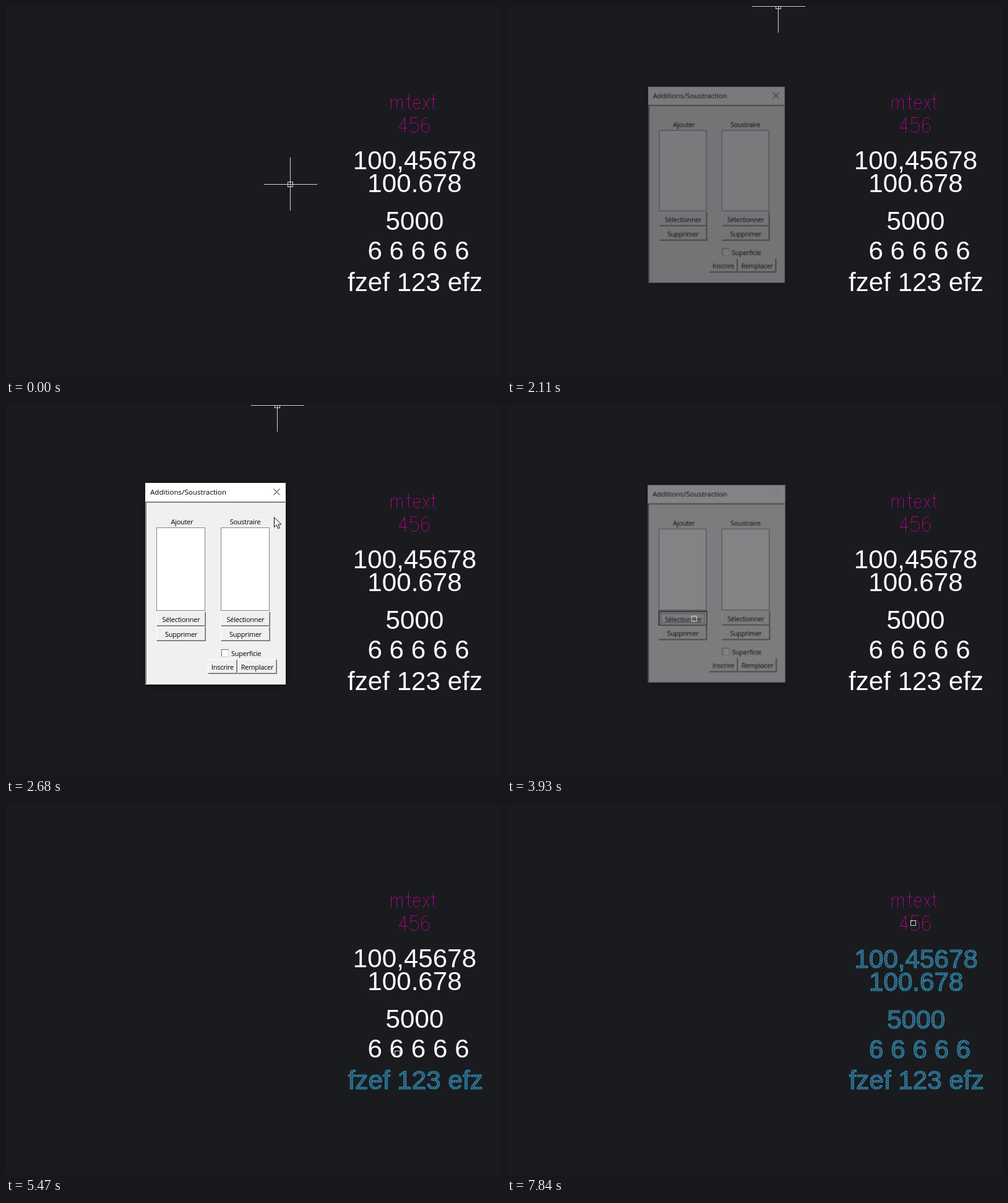
Recreate the animation shown at these times as an HTML page. Size 800 by 600 pixels, loop 8 s.

```html
<!DOCTYPE html>
<html lang="fr">
<head>
<meta charset="utf-8">
<title>Additions/Soustraction</title>
<style>
  html, body { margin: 0; width: 100%; height: 100%; overflow: hidden; background: #1a1b1e; }
  body { position: relative; }
  :root { --loop: 8s infinite; --glide: cubic-bezier(.23, .54, .4, .97); }
  svg.stage { position: absolute; left: 0; top: 0; }

  /* Drawing texts */
  .labels { font: 42.2px "Liberation Sans", Arial, sans-serif; fill: #fff; text-anchor: middle; }
  .mtext { fill: none; stroke: #b8008f; stroke-width: 1; }
  .labels text { stroke-width: 1.2; }
  .pick1 { animation: pick1 var(--loop) step-end; }
  .pick2 { animation: pick2 var(--loop) step-end; }
  .pick3 { animation: pick3 var(--loop) step-end; }
  .pick4 { animation: pick4 var(--loop) step-end; }
  .pick5 { animation: pick5 var(--loop) step-end; }
  @keyframes pick1 { 62.625%, 100% { fill: url(#hatch); stroke: #178fc2; transform: translate(.7px, .7px); } }
  @keyframes pick2 { 71.75%, 100% { fill: url(#hatch); stroke: #178fc2; transform: translate(.7px, .7px); } }
  @keyframes pick3 { 78.625%, 100% { fill: url(#hatch); stroke: #178fc2; transform: translate(.7px, .7px); } }
  @keyframes pick4 { 85.75%, 100% { fill: url(#hatch); stroke: #178fc2; transform: translate(.7px, .7px); } }
  @keyframes pick5 { 93.875%, 100% { fill: url(#hatch); stroke: #178fc2; transform: translate(.7px, .7px); } }

  /* Dialog */
  .dialog, .dialog * { position: absolute; box-sizing: border-box; white-space: nowrap; }
  .dialog {
    left: 225px; top: 126px; width: 227px; height: 326px; background: #f0f0f0;
    box-shadow: 0 2px 12px rgba(0, 0, 0, .45); color: #000;
    font: 11px/14px "Open Sans", "Noto Sans", sans-serif; letter-spacing: -.25px;
    animation: dialog var(--loop) linear;
  }
  .title { left: 0; top: 0; width: 227px; height: 30px; padding-left: 8px; background: #fff;
    font-size: 11.6px; line-height: 30px; letter-spacing: 0; }
  .close { left: 207px; top: 9px; animation: dim var(--loop) step-end; }
  .frame { left: 0; top: 30px; width: 227px; height: 296px; border: 1px solid;
    border-color: #a0a0a0 #fff #fff #a0a0a0; box-shadow: inset 1px 1px #696969, inset -1px -1px #e3e3e3; }
  .list { top: 72px; width: 79px; height: 135px; background: #fff; border: 1px solid #82858c; }
  .caption { top: 56px; width: 79px; text-align: center; }
  .button { width: 80px; height: 24px; line-height: 23px; text-align: center; background: #f0f0f0;
    border: 1px solid; border-color: #fff #696969 #696969 #fff; box-shadow: inset -1px -1px #a0a0a0; }
  .check { left: 123px; top: 269px; width: 12px; height: 12px; background: #fff; border: 1px solid;
    border-color: #696969 #d0d0d0 #d0d0d0 #696969; }
  .pressed { border-color: #111; box-shadow: inset 1px 1px #808080; padding-left: 2px; line-height: 25px;
    animation: press var(--loop) step-end; }
  .pressed i { inset: 3px; border: 1px dotted #222; }
  .left { left: 18px; }
  .right { left: 122px; }
  @keyframes dialog {
    0%, 26.37% { opacity: 0; transform: scale(.972); }
    26.375%, 26.7% { opacity: .42; transform: scale(.972); animation-timing-function: ease-out; }
    29.125%, 48.1% { opacity: 1; transform: none; }
    49.2% { opacity: .43; transform: scale(.978); }
    50.25%, 100% { opacity: 0; transform: scale(.96); }
  }
  @keyframes press { 0% { opacity: 0; } 46.125%, 100% { opacity: 1; } }
  @keyframes dim { 0% { opacity: 1; } 48.1%, 100% { opacity: .1; } }

  /* Cursors */
  .cursor { fill: none; stroke: #d6d6d6; shape-rendering: crispEdges; }
  .cross { animation: cross var(--loop) var(--glide), crossShow var(--loop) step-end; }
  .arrow { animation: arrow var(--loop) linear, arrowShow var(--loop) step-end; }
  .box { animation: box var(--loop) var(--glide), boxShow var(--loop) step-end; }
  @keyframes cross {
    0%, .25% { transform: translate(459px, 288px); }
    2.125%, 5.125% { transform: translate(454px, 266px); }
    8.5%, 100% { transform: translate(438px, 0); }
  }
  @keyframes crossShow { 0% { opacity: 1; } 48.1%, 100% { opacity: 0; } }
  @keyframes arrow {
    0%, 30.875% { transform: translate(558px, 10px); }
    33.5% { transform: translate(433px, 181px); animation-timing-function: var(--glide); }
    40.875%, 100% { transform: translate(302px, 345px); }
  }
  @keyframes arrowShow { 0% { opacity: 0; } 30.875% { opacity: 1; } 48.1%, 100% { opacity: 0; } }
  @keyframes box {
    0%, 52.125% { transform: translate(302px, 345px); }
    58.875%, 63% { transform: translate(578px, 447px); }
    68.375%, 72.125% { transform: translate(632px, 403px); }
    74.5%, 79% { transform: translate(650px, 350px); }
    81.25%, 86.125% { transform: translate(655px, 288px); }
    91.25%, 94.25% { transform: translate(656px, 245px); }
    98%, 100% { transform: translate(656px, 192px); }
  }
  @keyframes boxShow {
    0%, 62.25%, 71.375%, 78.25%, 85.375%, 93.5% { opacity: 0; }
    48.5%, 63%, 72.125%, 79%, 86.125%, 94.25%, 100% { opacity: 1; }
  }
</style>
</head>
<body>
<div class="dialog">
  <div class="title">Additions/Soustraction</div>
  <svg class="close" width="11" height="11"><path d="M.5 .5l10 10M10.500 .5l-10 10" stroke="#000" fill="none"/></svg>
  <div class="frame"></div>
  <div class="caption" style="left:20px">Ajouter</div>
  <div class="caption right">Soustraire</div>
  <div class="list left"></div>
  <div class="list right"></div>
  <div class="button left" style="top:208px">Sélectionner</div>
  <div class="button left" style="top:232px">Supprimer</div>
  <div class="button right" style="top:208px">Sélectionner</div>
  <div class="button right" style="top:232px">Supprimer</div>
  <div class="button left pressed" style="top:208px">Sélectionner<i></i></div>
  <div class="check"></div>
  <div style="left:139px;top:269px">Superficie</div>
  <div class="button" style="left:101px;top:285px;width:48px">Inscrire</div>
  <div class="button" style="left:149px;top:285px;width:64px">Remplacer</div>
</div>

<svg class="stage" width="800" height="600" viewBox="0 0 800 600">
  <defs>
    <pattern id="hatch" width="4" height="4" patternUnits="userSpaceOnUse">
      <path d="M-1 -1L5 5M5 -1L-1 5" stroke="#7fa6b8" stroke-width=".8"/>
    </pattern>
  </defs>

  <g class="mtext" role="img" aria-label="mtext 456">
    <path d="M622.5 150V167M622.500 155Q626 150 628.500 150Q631.500 150 631.500 155V167M631.500 155Q635 150 637.500 150Q640.500 150 640.500 155V167"/>
    <path id="t" d="M650.500 143V162Q650.500 166.500 654.500 166.500M646.500 150.500H654.500"/>
    <path d="M658.500 157.500H669.500Q669.500 150.500 664 150.500Q658.500 150.500 658.500 158.500Q658.500 166.500 664 166.500Q667 166.500 669.500 163.500"/>
    <path d="M674 150L684 167M684 150L674 167"/>
    <use href="#t" x="40"/>
    <path d="M644.500 205V180.500L635.500 197.500H648.500"/>
    <path d="M665 180.500H654.500L653.500 191Q656 188.500 659.500 188.500Q666.500 189 666.500 196.500Q666.500 204.500 659 204.500Q654.500 204.500 653 200"/>
    <path d="M682.500 183.500Q681 180.500 678 180.500Q671.500 181 671.500 194Q671.500 204.500 678 204.500Q684 204 684 197Q684 190 678 190Q672.500 190 671.500 197"/>
  </g>

  <g class="labels">
    <text class="pick5" x="660.5" y="264">100,45678</text>
    <text class="pick4" x="660.5" y="301">100.678</text>
    <text class="pick3" x="660.5" y="362">5000</text>
    <text class="pick2" x="666.5" y="410">6 6 6 6 6</text>
    <text class="pick1" x="661" y="460.500">fzef 123 efz</text>
  </g>

  <g class="cursor cross">
    <path d="M-42 .5H44M.5 -43V43"/>
    <rect x="-3.5" y="-3.500" width="8" height="8"/>
  </g>
  <path class="arrow" d="M.5 .5V16.500L4.300 13L6.800 18.700L9.300 17.600L6.900 12H11.900Z" fill="#fff" stroke="#000"/>
  <rect class="cursor box" x="-3.500" y="-3.500" width="8" height="8"/>
</svg>
</body>
</html>
```
